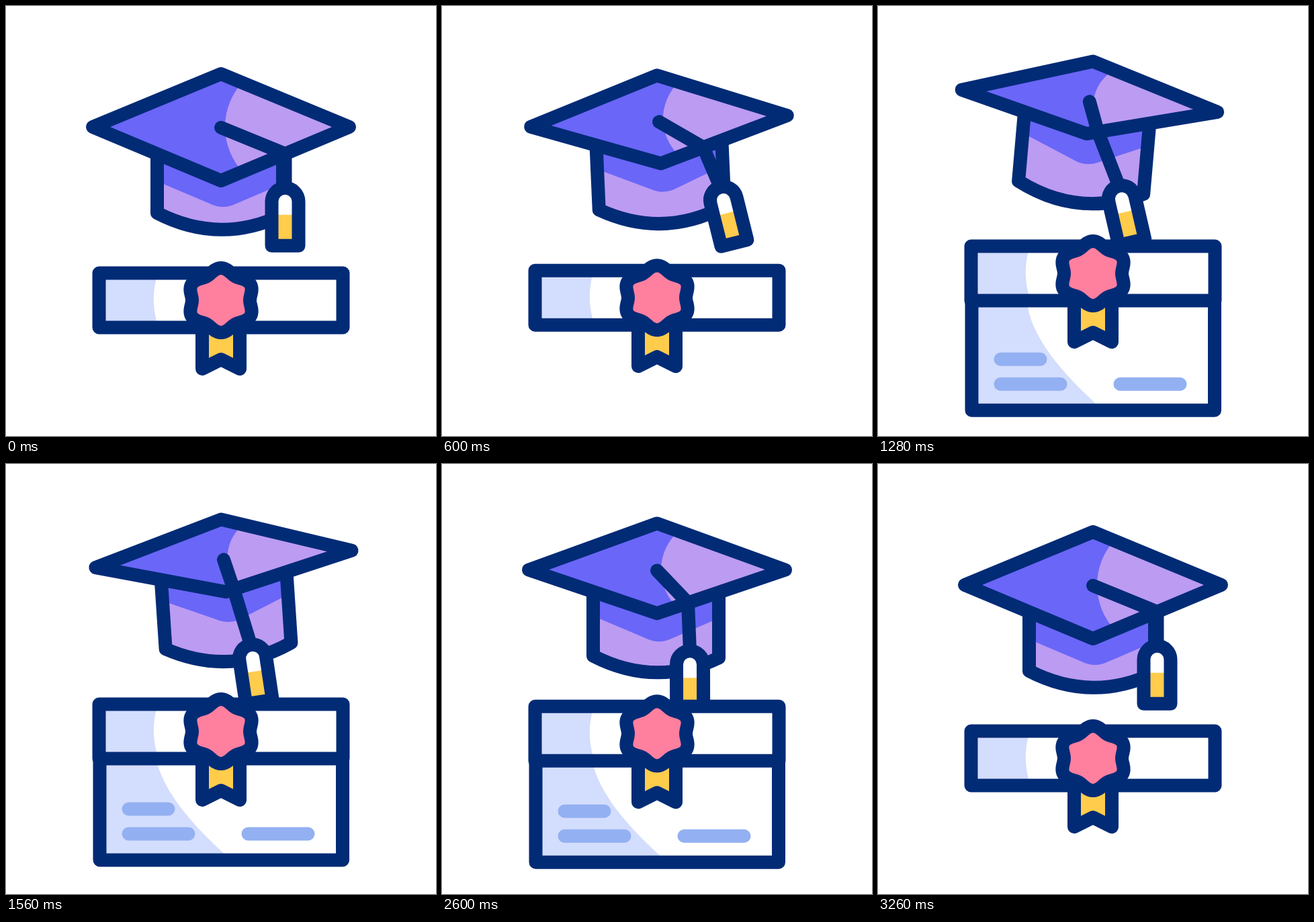
Animation, 640 px wide and 640 px high, one loop 3560 ms. Source, as an HTML page with a canvas:

```html
<!DOCTYPE html>
<html lang="en">
<head>
<meta charset="utf-8">
<title>Graduation cap and diploma</title>
<style>
html, body { margin: 0; width: 100%; height: 100%; overflow: hidden; background: #fff; }
canvas { display: block; width: 100vw; height: 100vh; }
</style>
</head>
<body>
<canvas id="stage" width="640" height="640"></canvas>
<script>
const g = document.getElementById('stage').getContext('2d');
const LOOP = 3560;
const NAVY = '#022b76', BLUE = '#6a66f8', LILAC = '#bc9bf2', SHADE = '#d3ddfd',
      BAR = '#93b0f2', PINK = '#ff7f9f', GOLD = '#ffcc4c', WHITE = '#fff';

const rad = deg => deg * Math.PI / 180;
const mix = (a, b, k) => a + (b - a) * k;

// Everything dips, springs up, sways while the sheet is out, then settles.
function pose(t) {
  const ease = (from, to) => {
    const k = Math.min(1, Math.max(0, (t - from) / (to - from)));
    return (1 - Math.cos(Math.PI * k)) / 2;
  };
  const dip = ease(220, 420), fall = ease(2400, 2800);
  const sway = ease(740, 1270) - ease(1270, 1645) + ease(1645, 2150);
  return {
    capY: 30 * dip - 68.5 * ease(420, 755) + 38.5 * ease(2400, 2850),
    flat: ease(445, 740) - fall,
    tilt: 10 * sway - 5 * ease(460, 740) - 5 * ease(2150, 2600),
    slack: ease(460, 780) - fall,
    swing: 32 * ease(420, 700) - 15 * ease(700, 1600) + 11 * ease(1600, 2080) - 28 * ease(2080, 2720),
    twist: 17 * ease(420, 670) - 8.5 * ease(1020, 1560) + 28.5 * ease(1560, 2050) - 37 * ease(2050, 2620),
    scrollY: 33 * dip - 73 * ease(420, 780) + 40 * ease(2525, 2940),
    unroll: 164.5 * ease(730, 1320) - 14 * ease(1320, 1540) - 150.5 * ease(2620, 3260)
  };
}

function fill(path, color) {
  g.fillStyle = color;
  g.fill(path);
}

function clipped(path, draw) {
  g.save();
  g.clip(path);
  draw();
  g.restore();
}

function box(x, y, w, h, r = 0) {
  const p = new Path2D();
  p.roundRect(x, y, w, h, r);
  return p;
}

function drawCap(s) {
  const y = s.capY, mid = 180 + y;
  const top = mid - 79 + 20 * s.flat;
  const bottom = mid + 80 - 31 * s.flat;
  const a = rad(s.tilt), cos = Math.cos(a), sin = Math.sin(a);
  // The cap tilts about the far corner of its board.
  const turn = (px, py) => [320 + (px - 320) * cos - (py - top) * sin,
                            top + (px - 320) * sin + (py - top) * cos];

  g.save();
  g.translate(320, top);
  g.rotate(a);
  g.translate(-320, -top);

  const body = new Path2D(`M225 ${mid + 20}V${308 + y}Q318 ${356 + y} 412 ${311 + y}V${mid + 20}Z`);
  const band = y - 25 * s.flat;
  fill(body, BLUE);
  clipped(body, () => fill(new Path2D(
    `M220 ${259 + band}L303 ${294 + band}Q323 ${304 + band} 343 ${294 + band}` +
    `L420 ${261 + band}V400H220Z`), LILAC));
  g.stroke(body);

  const board = new Path2D(`M320 ${top}L511 ${mid}L320 ${bottom}L129 ${mid}Z`);
  fill(board, BLUE);
  clipped(board, () => {
    const light = box(424, 0, 200, 400);
    light.ellipse(424, mid, 98, 98 - 25 * s.flat, 0, 0, 2 * Math.PI);
    fill(light, LILAC);
  });
  g.stroke(board);
  g.restore();

  // The cord bends over the front edge of the board, then hangs.
  const phi = rad(s.swing);
  const [bx, by] = turn(320, mid + 1);
  const u = mix(0.5, 0.0057 * s.swing - 0.035, s.slack);
  const [jx, jy] = turn(320 + 191 * u, mix(bottom, mid, u));
  const rest = 133 + 21 * (1 - s.slack) ** 2 - Math.hypot(jx - bx, jy - by);
  const ex = jx + rest * Math.sin(phi), ey = jy + rest * Math.cos(phi);
  g.stroke(new Path2D(`M${bx} ${by}L${jx} ${jy}L${ex} ${ey}`));

  g.save();
  g.translate(ex, ey);
  g.rotate(-rad(s.twist));
  const tassel = new Path2D('M-20 86V20A20 20 0 0 1 20 20V86Z');
  fill(tassel, WHITE);
  fill(box(-20, 40, 40, 46), GOLD);
  g.stroke(tassel);
  g.restore();
}

// The sheet slides out from behind the lower edge of the roll.
function drawPaper(drop) {
  clipped(box(0, 478, 640, 400), () => {
    g.translate(0, 479 + drop);
    const sheet = box(139.5, -220, 361.5, 220);
    fill(sheet, WHITE);
    fill(new Path2D('M139.5 -220H220L222 -160Q229 -97 322 -12L335 0H139.5Z'), SHADE);
    fill(box(172.5, -86, 79, 20, 10), BAR);
    for (const x of [172.5, 350.5]) fill(box(x, -49, 109, 20, 10), BAR);
    g.stroke(sheet);
  });
}

function drawSeal() {
  const p = new Path2D();
  for (let i = 0; i < 120; i++) {
    const a = i * Math.PI / 60, r = 44.5 + 3.5 * Math.cos(6 * a);
    p.lineTo(320 + 1.05 * r * Math.sin(a), 438 - r * Math.cos(a));
  }
  p.closePath();
  fill(p, PINK);
  g.stroke(p);
}

function drawDiploma(s) {
  g.save();
  g.translate(0, s.scrollY);
  if (s.unroll > 0.01) drawPaper(s.unroll);

  const roll = box(138.5, 397.5, 363, 81);
  fill(roll, WHITE);
  fill(new Path2D('M138.5 397.5H226Q213 438 227 478.5H138.5Z'), SHADE);
  g.stroke(roll);

  const ribbon = new Path2D('M292 470V540L320 526L348 540V470Z');
  fill(ribbon, GOLD);
  g.stroke(ribbon);
  drawSeal();
  g.restore();
}

function draw(now) {
  const s = pose(now % LOOP);
  g.fillStyle = WHITE;
  g.fillRect(0, 0, 640, 640);
  g.strokeStyle = NAVY;
  g.lineWidth = 20;
  g.lineJoin = g.lineCap = 'round';
  drawCap(s);
  drawDiploma(s);
  requestAnimationFrame(draw);
}
requestAnimationFrame(draw);
</script>
</body>
</html>
```
